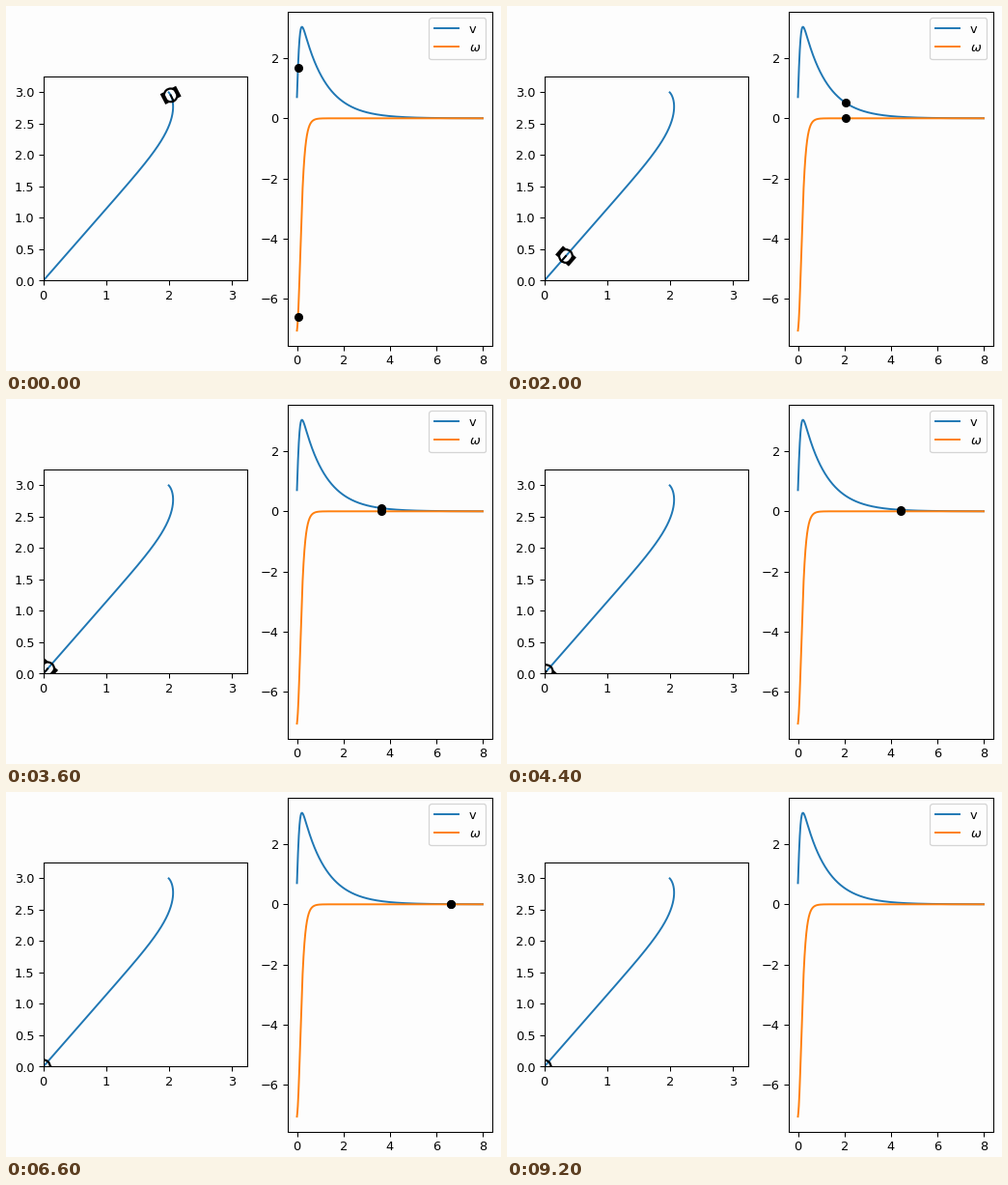
Recreate the animation shown at these times as a matplotlib script. Size 513 by 378 pixels, loop 10000 ms.

```python
import numpy as np
import matplotlib.pyplot as plt
from matplotlib.animation import FuncAnimation
from matplotlib.patches import Circle, Polygon

W, H, DPI = 513, 378, 93
PAPER = "#fdfdfd"
STEP = 0.1          # simulated seconds per frame
START = 0.045       # simulated time of the first frame
GAIN = 7.82
RADIUS = 0.105

plt.rcParams.update({"figure.facecolor": PAPER, "axes.facecolor": PAPER})


def simulate(ts):
    """Unicycle driven from (2, 3) to the origin, in polar coordinates."""
    bearing = np.arctan2(3, 2)
    err0 = 0.75 * np.pi - bearing
    err = np.arcsinh(np.sinh(err0) * np.exp(-GAIN * ts))
    sin, cos = np.sin(err), np.cos(err)

    def integral(f):
        return np.append(0, np.cumsum((f[1:] + f[:-1]) / 2 * np.diff(ts)))

    rho = np.hypot(2, 3) * np.exp(-integral(cos ** 2))
    phi = bearing - integral(sin * cos)
    v = rho * cos
    w = -GAIN * np.tanh(err) - sin * cos
    return rho * np.cos(phi), rho * np.sin(phi), phi + np.pi + err, v, w


def add_axes(left, top, right, bottom):
    return fig.add_axes([left / W, 1 - bottom / H,
                         (right - left) / W, (bottom - top) / H])


# The small margin keeps the pixel size from rounding down
fig = plt.figure(figsize=((W + 0.01) / DPI, (H + 0.01) / DPI), dpi=DPI)
plane = add_axes(38.6, 73.2, 249.9, 284.5)
plot = add_axes(291.9, 5.9, 503.6, 351.9)

times = np.linspace(0, 10.5, 5251)
path = simulate(times)
shown = times <= 8
xs, ys, _, vs, ws = (s[shown] for s in path)

plane.plot(xs, ys)
plane.set(xlim=(0, 3.25), ylim=(0, 3.25), xticks=range(4),
          yticks=np.arange(0, 3.1, 0.5))

plot.plot(times[shown], vs, label="v")
plot.plot(times[shown], ws, label=r"$\omega$")
plot.set_xticks(range(0, 9, 2))
plot.set_yticks(range(-6, 3, 2))
plot.set_xlim(-0.4, 8.4)
plot.legend(loc="upper right")
plot.set_ylim(plot.get_ylim())

body = plane.add_patch(Circle((0, 0), RADIUS, fill=False, ec="k", lw=1.7, zorder=4))
wheels = [plane.add_patch(Polygon(np.zeros((4, 2)), fc="k", ec="none", zorder=4))
          for _ in range(2)]
nose, = plane.plot([], [], "k", lw=1.5, zorder=4)
dots = [plot.plot([], [], "ko", zorder=5)[0] for _ in range(2)]


def draw(i):
    t = START + STEP * i
    x, y, theta, v, w = (np.interp(t, times, s) for s in path)
    pos = np.array([x, y])
    ahead = np.array([np.cos(theta), np.sin(theta)])
    side = np.array([-ahead[1], ahead[0]])

    body.center = x, y
    tip = pos + RADIUS * ahead
    nose.set_data([x, tip[0]], [y, tip[1]])
    for wheel, sign in zip(wheels, (1, -1)):
        wheel.set_xy([pos + a * ahead + sign * s * side
                      for a, s in ((-0.093, 0.078), (0.093, 0.078),
                                   (0.093, 0.142), (-0.093, 0.142))])
    for dot, val in zip(dots, (v, w)):
        dot.set_data([t], [val])
    return [body, nose, *wheels, *dots]


anim = FuncAnimation(fig, draw, frames=100, interval=100,
                     repeat=True, repeat_delay=0, blit=False)
plt.show()
```
